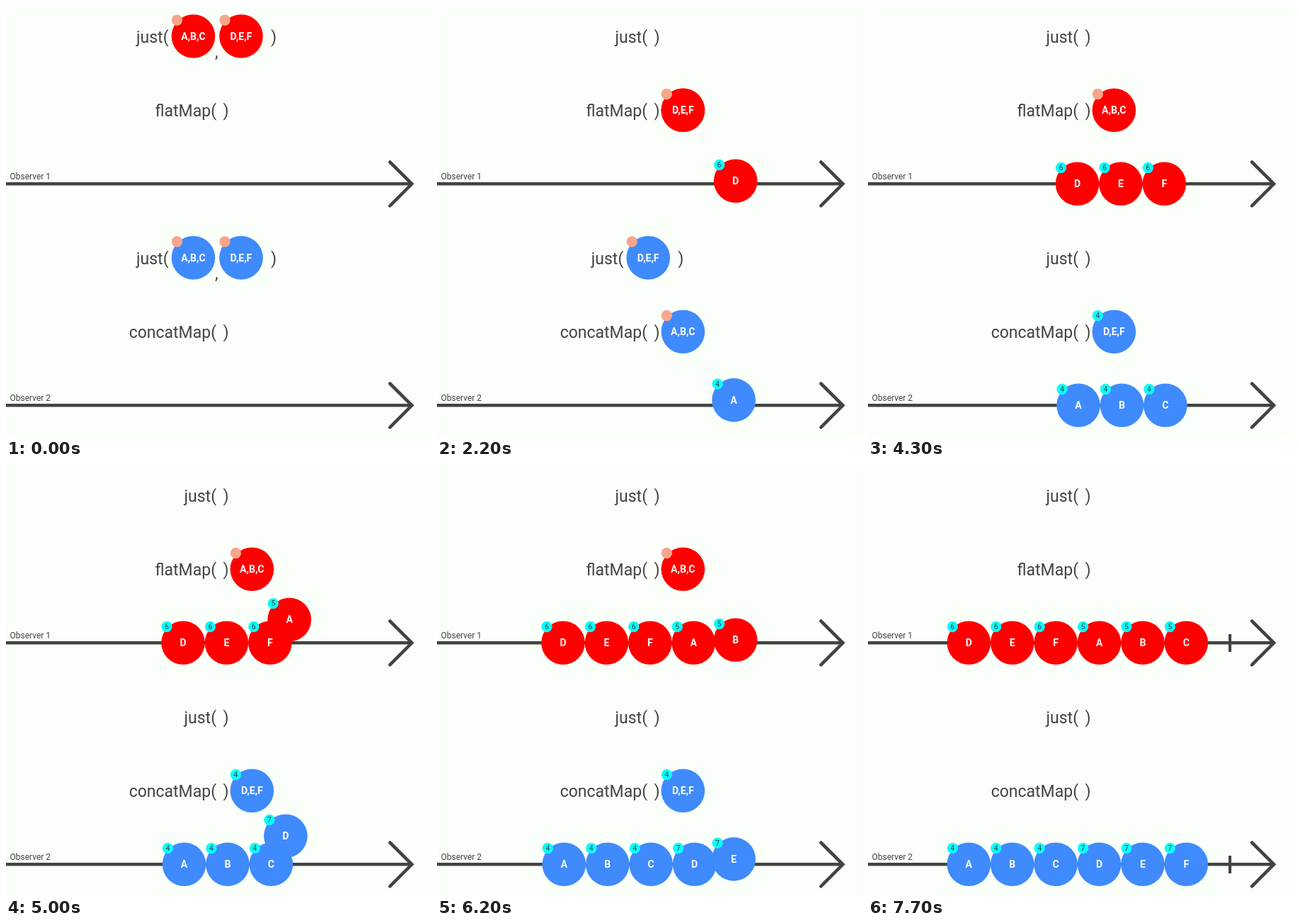
These frames come from a looping animation (600x609 px, 7.8 s). An HTML page with a canvas:

```html
<!DOCTYPE html>
<html lang="en">
<head>
<meta charset="utf-8">
<title>flatMap and concatMap</title>
<style>
html, body { margin: 0; width: 100%; height: 100%; overflow: hidden; background: #fafff9; }
canvas { display: block; }
</style>
</head>
<body>
<canvas id="stage" width="600" height="609"></canvas>
<script>
const ctx = document.getElementById('stage').getContext('2d');
const LOOP = 7800, STEP = 100, FLIGHT = 500;
const INK = '#41443f', PINK = '#f8a58d', CYAN = '#0cfcfc';
const RADIUS = 30.8, SLOT = 61.4, GAP = 67.5, MID = 298.2;
const JUST_Y = 42.8, MAP_X = 347.3, MAP_Y = 147.3, LINE_Y = 251.3;
const LAND_X = 424.5, LAST_X = 449.3, BAR_X = 511;

const EMIT = [1763, 2763, 3763, 4690, 5763, 6763];
const SUBSCRIBE = 707, BAR_TIME = EMIT[5] + FLIGHT;
// [time, x] of the first item while the row drifts left
const DRIFT = [[2263, 424], [3600, 341], [5000, 250], [6200, 178], [6790, 142.3]];

const streams = [
  {
    top: 0, lag: 0, color: '#fe0000', map: 'flatMap(', name: 'Observer 1',
    items: 'DEFABC', threads: [6, 5],
    bubbles: [
      { text: 'A,B,C', leave: SUBSCRIBE, gone: EMIT[5] },
      { text: 'D,E,F', leave: SUBSCRIBE, gone: EMIT[2] }
    ]
  },
  {
    top: 313, lag: 23, color: '#3f8afc', map: 'concatMap(', name: 'Observer 2',
    items: 'ABCDEF', threads: [4, 7],
    bubbles: [
      { text: 'A,B,C', leave: SUBSCRIBE, gone: EMIT[2] },
      { text: 'D,E,F', leave: EMIT[2], gone: EMIT[5], thread: 4 }
    ]
  }
];

const mix = (a, b, k) => a + (b - a) * k;
const ease = u => (1 - Math.cos(Math.PI * Math.min(1, Math.max(0, u)))) / 2;

function write(text, x, y, size, align = 'left', color = INK, weight = 400) {
  ctx.font = `${weight} ${size}px Roboto, sans-serif`;
  ctx.textAlign = align;
  ctx.fillStyle = color;
  ctx.fillText(text, x, y);
}

function disc(x, y, r, color) {
  ctx.fillStyle = color;
  ctx.beginPath();
  ctx.arc(x, y, r, 0, 2 * Math.PI);
  ctx.fill();
}

function stroke(points, width, cap = 'butt') {
  ctx.strokeStyle = INK;
  ctx.lineWidth = width;
  ctx.lineCap = cap;
  ctx.beginPath();
  points.forEach(([x, y]) => ctx.lineTo(x, y));
  ctx.stroke();
}

function marble(x, y, color, text, thread) {
  disc(x, y, RADIUS, color);
  write(text, x, y + 5, 14, 'center', '#fff', 700);
  disc(x - 23, y - 22.8, 7.7, thread ? CYAN : PINK);
  if (thread) write(thread, x - 23, y - 19, 10.5, 'center', '#26403f');
}

function rowX(t) {
  let x = DRIFT[0][1];
  for (let i = 1; i < DRIFT.length; i++) {
    const [t0, x0] = DRIFT[i - 1], [t1, x1] = DRIFT[i];
    if (t > t0) x = mix(x0, x1, Math.min(1, (t - t0) / (t1 - t0)));
  }
  return x;
}

function drawStream(s, t) {
  ctx.save();
  ctx.translate(0, s.top);

  stroke([[0, LINE_Y], [573, LINE_Y]], 4.4);
  stroke([[542, 220.5], [573, LINE_Y], [542, 282.3]], 4.6, 'round');
  write(s.name, 5.5, 245.3, 12);
  if (t >= BAR_TIME) stroke([[BAR_X, 239], [BAR_X, 264]], 4);

  const waiting = s.bubbles.filter(b => t < b.leave);
  const spread = waiting.length * GAP / 2;
  write('just(', 297 - spread, 52, 23, 'right');
  write(')', 306.4 + spread, 52, 23);
  if (waiting.length > 1) write(',', MID - 1, 73, 23, 'center');
  write(s.map, 297, 156, 23, 'right');
  write(')', 306.4, 156, 23);

  s.bubbles.forEach((b, i) => {
    if (t >= b.gone) return;
    if (t < b.leave) {
      const x = MID + (waiting.indexOf(b) - (waiting.length - 1) / 2) * GAP;
      marble(x, JUST_Y, s.color, b.text);
    } else {
      const k = ease((t - b.leave) / FLIGHT);
      const from = i ? MID : MID - GAP / 2;
      marble(mix(from, MAP_X, k), mix(JUST_Y, MAP_Y, k), s.color, b.text, b.thread);
    }
  });

  EMIT.forEach((start, i) => {
    if (t < start) return;
    const u = (t - start) / FLIGHT, k = ease(u);
    const x = u < 1 ? mix(MAP_X, i < 5 ? LAND_X : LAST_X, k) : rowX(t) + i * SLOT;
    marble(x, mix(MAP_Y, LINE_Y, k), s.color, s.items[i], s.threads[i < 3 ? 0 : 1]);
  });
  ctx.restore();
}

function frame() {
  const t = Math.floor(performance.now() % LOOP / STEP) * STEP;
  ctx.fillStyle = '#fafff9';
  ctx.fillRect(0, 0, 600, 609);
  streams.forEach(s => drawStream(s, t - s.lag));
  requestAnimationFrame(frame);
}
frame();
</script>
</body>
</html>
```
